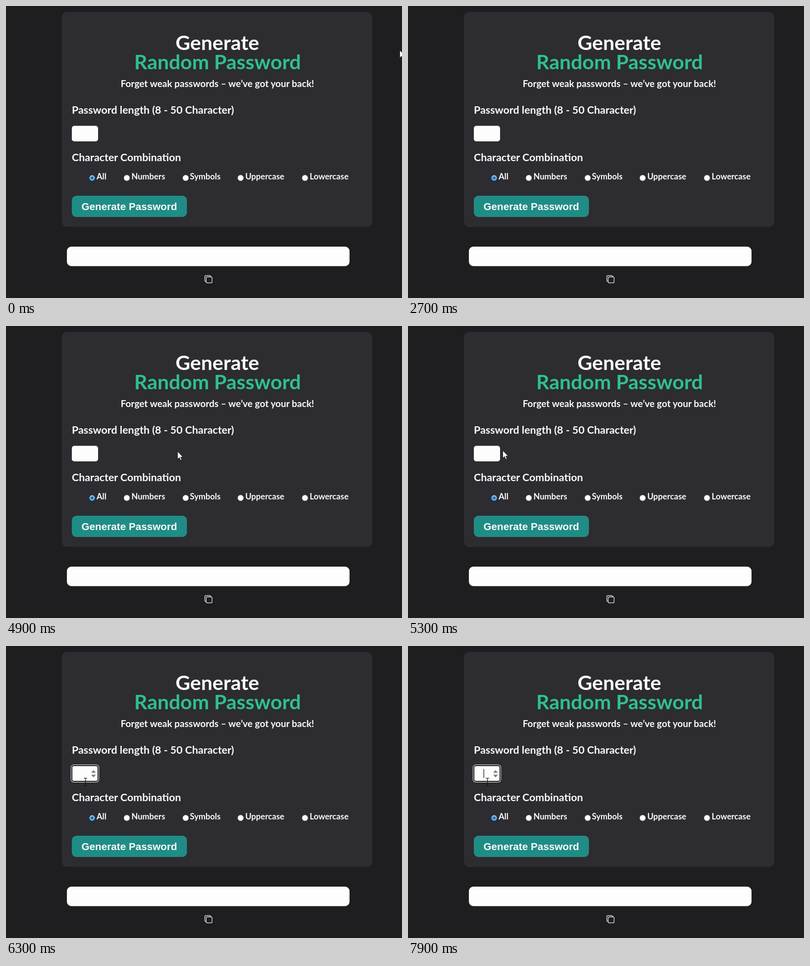
Write an HTML page that moves like this. It is 800 px wide and 591 px high and loops after 8 s.

```html
<!DOCTYPE html>
<html lang="en">
<head>
<meta charset="utf-8">
<title>Password generator</title>
<style>
  html, body { margin: 0; width: 100%; height: 100%; overflow: hidden; background: #1e1e20; }
  svg { display: block; width: 100vw; height: 100vh; }
  text { font-family: Lato, sans-serif; font-weight: 700; fill: #fcfcfc; }
  .title { font-size: 41px; text-anchor: middle; }
  .tagline { font-size: 19px; text-anchor: middle; }
  .label { font-size: 21.4px; }
  .option { font-size: 16.7px; }
  .button { font: 700 20.7px "Liberation Sans", Arial, sans-serif; }
</style>
</head>
<body>
<svg viewBox="0 0 800 591">
  <rect x="113" y="12" width="627" height="435" rx="10" fill="#2c2c31"/>
  <text class="title" x="427" y="89">Generate</text>
  <text class="title" x="427.5" y="128" style="fill:#30c08d">Random Password</text>
  <text class="tagline" x="427" y="164">Forget weak passwords – we’ve got your back!</text>
  <text class="label" x="133" y="218">Password length (8 - 50 Character)</text>
  <text class="label" x="133" y="314">Character Combination</text>

  <rect x="133" y="242.5" width="53" height="31.5" rx="5" fill="#fdfdfd"/>
  <g id="focus">
    <rect x="131" y="240" width="57" height="36" rx="6" fill="#fdfdfd"/>
    <rect x="133" y="242" width="53" height="32" rx="4" fill="#fdfdfd" stroke="#101012" stroke-width="2"/>
  </g>
  <path id="spinner" d="M172 256.5l4.8-5.5 4.8 5.5zM172 260.5l4.8 5.5 4.8-5.5z" fill="#7d7d7d"/>
  <rect id="caret" x="152.5" y="249" width="1.3" height="18" fill="#222"/>

  <g id="options"></g>
  <rect x="133" y="384" width="232.5" height="43" rx="9" fill="#208c86"/>
  <text class="button" x="152.5" y="413">Generate Password</text>

  <rect x="123" y="487" width="571" height="39.5" rx="9" fill="#fdfdfd"/>
  <g fill="#1e1e20" stroke="#f2f2f2" stroke-width="1.2">
    <rect x="401.6" y="545.6" width="12" height="12" rx="2.5"/>
    <rect x="404.4" y="548.4" width="12" height="12" rx="2.5"/>
  </g>

  <path id="arrow" d="M.5 .5V16L4 12.6 6.4 18.2 8.8 17.2 6.4 11.7H11.2Z" fill="#fff" stroke="#111" stroke-width=".8"/>
  <path id="beam" d="M-3.5-7.5H-1Q0-7.5 0-6.5Q0-7.5 1-7.5H3.5M0-6.5V6.5M-3.5 7.5H-1Q0 7.5 0 6.5Q0 7.5 1 7.5H3.5" fill="none" stroke="#111" stroke-width="1.2"/>
</svg>
<script>
const $ = id => document.getElementById(id);
const LOOP = 8000, STEP = 100, HOVER = 5400, CLICK = 5600, BLINK = 500;

const options = [["All", 174, 183], ["Numbers", 244, 253.5], ["Symbols", 363, 371.5],
                 ["Uppercase", 474, 483.5], ["Lowercase", 604, 613.5]];
$("options").innerHTML = options.map(([name, cx, x], i) =>
  `<circle cx="${cx}" cy="348" r="${i ? 6 : 5.4}" fill="#fdfdfd" stroke="${i ? "#77777b" : "#1c72b8"}" stroke-width="${i ? .6 : 1.4}"/>` +
  (i ? "" : `<circle cx="${cx}" cy="348" r="3.6" fill="#1c72b8"/>`) +
  `<text class="option" x="${x}" y="351">${name}</text>`).join("");

// Pointer visits: each is a run of [time, x, y], ending at "until".
const visits = [
  { until: 1500, path: [[0, 795, 89], [200, 765, 68], [700, 701, 155.5], [1300, 701, 155.5], [1400, 721, 137]] },
  { until: 3200, path: [[3000, 789, 84], [3100, 568, 0]] },
  { until: 3900, path: [[3400, 645, 129], [3500, 657, 160]] },
  { until: LOOP, path: [[4500, 511, 243], [4600, 385, 254], [4800, 385, 254], [5300, 191, 251.5],
                        [5400, 174, 260], [5800, 160.5, 275]] }
];

function pointer(t) {
  const visit = visits.find(v => t >= v.path[0][0] && t < v.until);
  if (!visit) return null;
  const { path } = visit;
  const i = path.findIndex(p => p[0] > t);
  if (i < 0) return path.at(-1).slice(1);
  const [t0, x0, y0] = path[i - 1], [t1, x1, y1] = path[i];
  const k = (t - t0) / (t1 - t0);
  return [x0 + (x1 - x0) * k, y0 + (y1 - y0) * k];
}

const show = (id, on) => $(id).style.display = on ? "" : "none";

function draw(now) {
  const t = Math.floor(now % LOOP / STEP) * STEP;
  const at = pointer(t), over = t >= HOVER, focused = t >= CLICK;
  show("focus", focused);
  show("spinner", over);
  show("caret", focused && Math.floor((t - CLICK) / BLINK) % 2 === 0);
  show("arrow", at && !over);
  show("beam", at && over);
  if (at) $(over ? "beam" : "arrow").setAttribute("transform", `translate(${at})`);
  requestAnimationFrame(draw);
}
requestAnimationFrame(draw);
</script>
</body>
</html>
```
